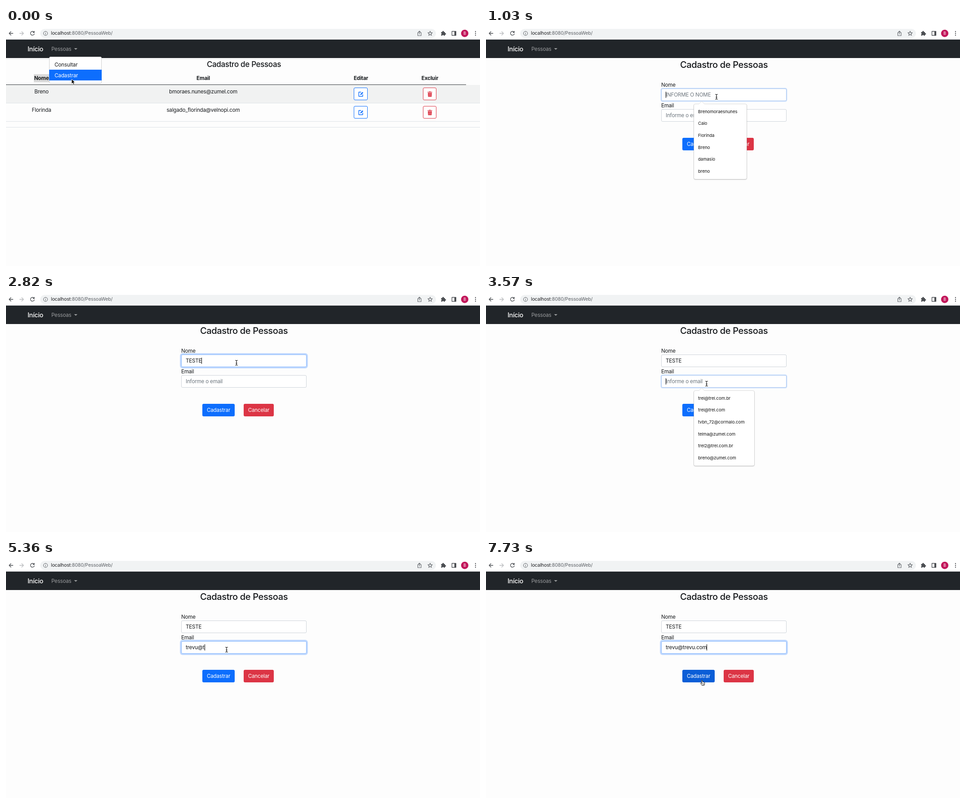
Animation, 1055 px wide and 531 px high, one loop 8 s. Source, as an HTML page:

```html
<!DOCTYPE html>
<html lang="pt-BR">
<head>
<meta charset="utf-8">
<title>Cadastro de Pessoas</title>
<style>
html, body { margin: 0; width: 100%; height: 100%; overflow: hidden; background: #fdfdfd; }
body { position: relative; font: 11.6px/20px Inter, "Open Sans", sans-serif; font-optical-sizing: none;
  letter-spacing: -.015em; color: #15181b; }
#stage { position: absolute; left: 0; top: 0; width: 1055px; height: 531px; overflow: hidden; }
#stage div, #stage svg { position: absolute; box-sizing: border-box; }
svg { left: 0; top: 0; overflow: visible; }
.t { white-space: pre; }
.mid { width: 400px; text-align: center; }
.b { font-weight: 700; }
.small-title, .title { font-size: 17px; font-weight: 500; letter-spacing: -.02em; }
.title { font-size: 20.1px; }
.white { color: #fff; }
.avatar { font-size: 8.5px; color: #fff; }
.url { font-size: 10.65px; color: #5f6368; }
.url b { font-weight: 400; color: #202124; }
.brand { font-size: 14.3px; font-weight: 500; letter-spacing: -.02em; color: #fff; }
.link { font-size: 11.5px; color: #9b9d9f; }
.menu { background: #fff; border: 1px solid #cfcfcf; border-radius: 3px; }
.field { left: 390px; width: 279px; height: 28px; padding-left: 9px; border: 1px solid #ced4da; border-radius: 3px;
  background: #fff; line-height: 26px; white-space: pre; }
.field i { display: inline-block; width: 1px; height: 14px; margin-right: -1px; background: #000; vertical-align: -3px; }
.field s { color: #6c757d; text-decoration: none; }
.btn { border-radius: 3px; }
.tips { left: 463px; min-width: 116px; padding: 4px 21px 3px 9px; background: #fff; border-radius: 3px;
  box-shadow: 0 0 0 .6px #c4c4c4, 0 1px 2.5px rgba(0,0,0,.3); font-size: 9.6px; letter-spacing: -.005em;
  line-height: 26.67px; white-space: pre; color: #111; }
.tips::before { content: ""; position: absolute; left: 11px; top: -6px; border: 6px solid transparent;
  border-top: 0; border-bottom-color: #fff; filter: drop-shadow(0 -.6px 0 #ddd); }
</style>
</head>
<body>
<div id="stage"></div>
<script>
const stage = document.getElementById('stage');
const BLUE = '#0d6efd', RED = '#dc3545';

const text = (x, y, s, cls = '') => `<div class="t ${cls}" style="left:${x}px;top:${y - 10}px">${s}</div>`;
const mid = (x, y, s, cls = '') => text(x - 200, y, s, 'mid ' + cls);
const box = (x, y, w, h, css, cls = '', id = '') =>
  `<div ${id && `id="${id}"`} class="${cls}" style="left:${x}px;top:${y}px;width:${w}px;height:${h}px;${css}"></div>`;
const fill = (x, y, w, h, color, cls, id) => box(x, y, w, h, `background:${color}`, cls, id);
const svg = s => `<svg width="1055" height="531" fill="none">${s}</svg>`;
const line = (d, color = '#4a4d51', w = 1.3) =>
  `<path d="${d}" stroke="${color}" stroke-width="${w}" stroke-linejoin="round" stroke-linecap="round"/>`;
const dot = (x, y, r, color) => `<circle cx="${x}" cy="${y}" r="${r}" fill="${color}"/>`;

function browser() {
  const star = Array.from({ length: 10 }, (_, i) => {
    const r = i % 2 ? 2.2 : 5.3, a = i * Math.PI / 5 - Math.PI / 2;
    return (944 + r * Math.cos(a)).toFixed(2) + ' ' + (12.3 + r * Math.sin(a)).toFixed(2);
  }).join('L');
  return fill(0, 0, 1055, 25, '#fff') + fill(0, 25, 1055, 1, '#c9cbce') +
    fill(76, 2, 881, 20, '#f1f3f4;border-radius:10px') +
    svg(line('M15.5 12H7M11 8L7 12L11 16') +
      line('M30.5 12H39M35 8L39 12L35 16', '#b9bbbe') +
      line('M62.3 9.2A4.3 4.3 0 1 0 63 13M63 7.2V10H60.2') +
      '<circle cx="88" cy="12" r="4.6" stroke="#5f6368"/>' + line('M88 11.7V14.3M88 9.6V9.7', '#5f6368', 1.1) +
      line('M918.4 10.3H916.5V17H924V10.3H922.1M920.2 13.8V7M918 9L920.2 6.8L922.4 9', '#5f6368', 1.1) +
      line(`M${star}Z`, '#5f6368', 1.1) +
      '<path d="M968.5 9H971.2A1.8 1.8 0 1 1 974.6 9H977V11.4A1.8 1.8 0 1 1 977 14.8V17H974.4A1.6 1.6 0 0 0 971.2 17H968.5V14.4A1.6 1.6 0 0 0 968.5 11.4Z" fill="#4a4d51"/>' +
      line('M992.5 7.5H1001.5V16.5H992.5Z') + '<path d="M998 7H1002V17H998Z" fill="#4a4d51"/>' +
      dot(1021, 12, 8.2, '#c2185b') +
      [8, 12, 16].map(y => dot(1045, y, 1.15, '#4a4d51')).join('')) +
    text(100, 12, '<b>localhost</b>:8080/PessoaWeb/', 'url') +
    mid(1021, 12, 'B', 'avatar') +
    fill(0, 26, 1055, 41, '#212529') +
    text(48, 47, 'Início', 'brand') + text(101, 47, 'Pessoas', 'link') +
    svg('<path d="M151.5 45H159L155.25 48.6Z" fill="#9b9d9f"/>');
}

function tableRow(y, name, mail) {
  const edit = `M790 ${y + 1}H785.3V${y + 10.5}H794V${y + 6.5}`;
  const pen = `M788.6 ${y + 7.4}L789 ${y + 5.2}L793.4 ${y + .8}L795.2 ${y + 2.6}L790.8 ${y + 7}Z`;
  const bin = `M938.9 ${y + 2.8}H947.9L947.3 ${y + 11.5}H939.5ZM938.2 ${y + .5}H941.4L942 ${y - .4}H944.8L945.4 ${y + .5}H948.6V${y + 1.8}H938.2Z`;
  const frame = (x, w, c) => box(x, y - 9, w, 28, `border:1px solid ${c};border-radius:3px;background:#fff`);
  return mid(79, y, name) + mid(439, y, mail) + frame(774, 31, BLUE) + frame(928, 30, RED) +
    svg(line(edit, BLUE, 1.4) + `<path d="${pen}" fill="${BLUE}"/><path d="${bin}" fill="${RED}"/>` +
      line([941.3, 943.4, 945.5].map(x => `M${x} ${y + 4.6}V${y + 9.6}`).join(''), '#f0a5ac', .7));
}

const listPage = () =>
  fill(0, 69, 1055, 1, '#e6e8ea') + mid(529.5, 80.5, 'Cadastro de Pessoas', 'small-title') +
  fill(62, 103, 36, 18, '#dadada') +
  [[79, 'Nome'], [439, 'Email'], [790, 'Editar'], [943.5, 'Excluir']].map(([x, s]) => mid(x, 112, s, 'b')).join('') +
  fill(0, 127, 1055, 41, '#f1f2f2') + fill(0, 126, 1024, 1, '#33373b') +
  [167, 208, 221].map(y => fill(0, y, 1055, 1, '#dee2e6')).join('') +
  tableRow(142, 'Breno', 'bmoraes.nunes@zumel.com') +
  tableRow(183, 'Florinda', 'salgado_florinda@velnopi.com') +
  box(96, 64, 117, 60, '', 'menu') + fill(96, 93, 117, 24, BLUE) +
  text(108, 82, 'Consultar') + text(108, 105.5, 'Cadastrar', 'white');

const formPage = () =>
  mid(529.5, 82, 'Cadastro de Pessoas', 'title') +
  text(390, 127, 'Nome') + text(390, 172.5, 'Email') +
  '<div id="name" class="field" style="top:135px"></div><div id="mail" class="field" style="top:181px"></div>' +
  fill(437, 245, 72, 28, BLUE, 'btn', 'save') + fill(529, 245, 67, 28, RED, 'btn') +
  mid(473, 259, 'Cadastrar', 'white') + mid(562.5, 259, 'Cancelar', 'white') +
  '<div id="tips" class="tips"></div>';

const cursors = {
  arrow: '<path d="M0 0V10.6L2.5 8.3L4.2 12.2L6.1 11.3L4.4 7.6H7.7Z" fill="#000" stroke="#fff" stroke-width=".8"/>',
  beam: line('M-2.5 -5.5Q0 -5.5 0 -3.8Q0 -5.5 2.5 -5.5M0 -4V4M-2.5 5.5Q0 5.5 0 3.8Q0 5.5 2.5 5.5M-1.2 .9H1.2', '#111', 1.1),
  hand: '<path d="M-2.4 -5.2Q-1.4 -6.4 -.5 -5.2L.3 -1.8Q1.2 -2.6 1.9 -1.6Q2.9 -2.2 3.4 -1.1Q4.7 -1.4 4.8 .2L4.6 3L3.6 5.8H-1.2L-4.3 1.2Q-4.4 -.1 -3.2 .2L-1.4 1.6Z" fill="#fff" stroke="#111" stroke-width="1"/>'
    + line('M.7 1.4V4M2.4 1.4V4', '#111', .7)
};

const hints = {
  name: ['Brenomoraesnunes', 'Caio', 'Florinda', 'Breno', 'damasio', 'breno'],
  mail: ['trel@trel.com.br', 'trel@trel.com', 'tvbn_72@cormalo.com', 'telma@zumel.com', 'trel2@trel.com.br', 'breno@zumel.com']
};
const blank = { name: 'INFORME O NOME', mail: 'Informe o email' };
const ADDRESS = 'trevu@trevu.com';

const typeName = n => ({ name: 'TESTE'.slice(0, n) });
const typeMail = n => ({ mail: ADDRESS.slice(0, n) });
const at = (kind, x, y) => ({ cur: [kind, x, y] });

// Each step changes part of the running state.
const steps = [
  [0, { form: false, name: '', mail: '', focus: '', glow: 0, caret: true, hover: false, ...at('arrow', 146, 114) }],
  [150, at('arrow', 147, 115)],
  [300, { form: true }],
  [440, at('arrow', 190, 122)],
  [590, at('arrow', 330, 145)],
  [740, at('beam', 455, 156)],
  [890, at('beam', 513, 153.5)],
  [1030, { focus: 'name', glow: .5 }],
  [1180, { glow: 1 }],
  [1480, { caret: false }],
  [1930, { caret: true }],
  [2230, typeName(1)],
  [2380, typeName(2)],
  [2530, typeName(3)],
  [2820, typeName(5)],
  [3120, at('beam', 509, 160)],
  [3270, at('beam', 497, 188)],
  [3420, at('beam', 491, 200)],
  [3570, { focus: 'mail', glow: .5 }],
  [3720, { glow: 1 }],
  [3870, typeMail(1)],
  [4010, typeMail(2)],
  [4160, typeMail(3)],
  [4460, typeMail(5)],
  [4910, typeMail(6)],
  [5360, typeMail(7)],
  [5510, typeMail(8)],
  [5810, typeMail(9)],
  [5950, typeMail(11)],
  [6250, typeMail(12)],
  [6400, typeMail(13)],
  [6540, typeMail(14)],
  [6690, typeMail(15)],
  [6990, at('beam', 498, 206)],
  [7140, at('arrow', 511, 232)],
  [7290, { caret: false, ...at('arrow', 514, 262) }],
  [7430, at('arrow', 512, 272)],
  [7580, { hover: true, ...at('hand', 495, 271) }],
  [7730, { caret: true, ...at('hand', 482, 274) }]
];

stage.innerHTML = browser() + `<div id="list">${listPage()}</div><div id="form">${formPage()}</div>` +
  '<svg id="cursor" width="1" height="1"></svg>';
const el = Object.fromEntries([...stage.querySelectorAll('[id]')].map(e => [e.id, e]));

function drawField(id, s) {
  const on = s.focus === id;
  const caret = on && s.caret ? '<i></i>' : '';
  el[id].innerHTML = s[id] + caret + (s[id] ? '' : `<s>${blank[id]}</s>`);
  el[id].style.borderColor = on ? (s.glow < 1 ? '#a6c4ee' : '#86b7fe') : '#ced4da';
  el[id].style.boxShadow = on ? `0 0 0 ${2.9 * s.glow}px rgba(13,110,253,${.12 + .13 * s.glow})` : 'none';
}

function draw(s) {
  el.list.style.display = s.form ? 'none' : '';
  el.form.style.display = s.form ? '' : 'none';
  drawField('name', s);
  drawField('mail', s);
  const found = s.focus ? hints[s.focus].filter(h => h.startsWith(s[s.focus])) : [];
  el.tips.style.display = found.length ? '' : 'none';
  el.tips.style.top = (s.focus === 'mail' ? 215.7 : 169.7) + 'px';
  el.tips.innerHTML = found.join('<br>');
  el.save.style.background = s.hover ? '#0b5ed7' : BLUE;
  const [kind, x, y] = s.cur;
  el.cursor.innerHTML = `<g fill="none" transform="translate(${x} ${y})">${cursors[kind]}</g>`;
}

const start = performance.now();
let shown = -1;
function tick() {
  const t = (performance.now() - start) % 8000;
  const n = steps.filter(([time]) => time <= t).length;
  if (n !== shown) {
    shown = n;
    draw(Object.assign({}, ...steps.slice(0, n).map(step => step[1])));
  }
  requestAnimationFrame(tick);
}
tick();
</script>
</body>
</html>
```
